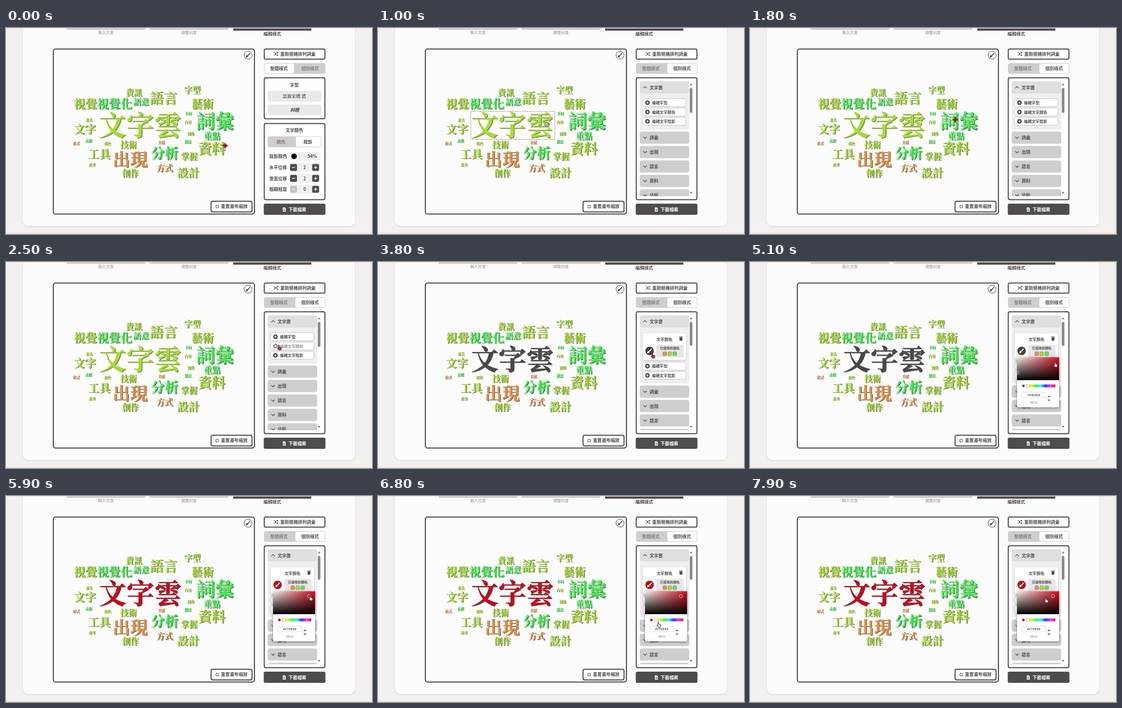
Animation, 688 px wide and 387 px high, one loop 8 s. Source, as an HTML page with a canvas:

```html
<!DOCTYPE html>
<html lang="zh-Hant">
<head>
<meta charset="utf-8">
<title>文字雲</title>
<style>
html, body { margin: 0; width: 100%; height: 100%; overflow: hidden; background: #f3f1ef; }
canvas { display: block; width: 688px; height: 387px; }
</style>
</head>
<body>
<canvas id="stage"></canvas>
<script>
const W = 688, H = 387, LOOP = 8000;
const cv = document.getElementById('stage');
const dpr = window.devicePixelRatio || 1;
cv.width = W * dpr;
cv.height = H * dpr;
const c = cv.getContext('2d');

const SANS = '"Noto Sans CJK TC", "Noto Sans TC", "Noto Sans CJK", sans-serif';
const SERIF = '"Noto Serif CJK TC", "Noto Serif TC", "Noto Sans CJK TC", serif';
const LATIN = '"Noto Serif", "Liberation Serif", serif';
const INK = '#504b4d', GREY = '#d1cdce', PALE = '#eae8e8', WHITE = '#fdfcfd';
const LIME = '#a6dc36', GREEN = '#45ec50', ORANGE = '#df944c';
const PICK_AT = 5300, TAB_AT = 800, EDIT_AT = 2900, OPEN_AT = 4400;

// text, centre x, centre y, size, colour
const words = [
  ['視覺', 150, 143, 22, LIME], ['視覺化', 205, 143, 22, GREEN], ['資訊', 241, 122, 15.5, LIME],
  ['語意', 255, 139, 15, GREEN], ['語言', 297, 132.5, 26, LIME], ['字型', 351, 117, 15.5, LIME],
  ['藝術', 370, 143, 21, LIME], ['詞彙', 394, 176.5, 36, GREEN], ['重點', 388, 203.5, 15.5, GREEN],
  ['資料', 387.5, 227.5, 26, LIME], ['文字', 149, 190, 21, LIME], ['工具', 176, 237, 21, LIME],
  ['技術', 231, 220, 15.5, LIME], ['出現', 234, 248, 33, ORANGE], ['分析', 299, 236, 26, GREEN],
  ['掌握', 345, 242, 15.5, LIME], ['方式', 299, 264, 15.5, ORANGE], ['設計', 343.5, 272, 21, LIME],
  ['創作', 234.5, 273.5, 15.5, LIME], ['兼具', 157, 173.5, 6.5, LIME], ['形式', 133, 217.5, 6.5, ORANGE],
  ['表現', 156, 213, 6.5, GREEN], ['顏色', 192, 218, 6.5, LIME], ['美感', 293, 216, 6.5, ORANGE],
  ['圖像', 348.5, 199.5, 6.5, LIME], ['創意', 343, 214.5, 6.5, GREEN], ['不同', 343.5, 161.5, 6.5, GREEN],
  ['內容', 343, 177.5, 6.5, LIME], ['故事', 163, 258, 6.5, LIME]
];

// time, x, y of the pointer
const path = [
  [0, 412, 221], [250, 412, 221], [700, 317, 181], [1500, 317, 181], [2250, 512, 156],
  [3000, 512, 156], [3600, 515, 171], [4500, 515, 171], [5000, 573, 188], [5350, 571, 187],
  [5900, 571, 187], [6600, 526, 237], [7100, 526, 237], [7750, 555, 191], [LOOP, 555, 191]
];

function pointer(t) {
  let i = 0;
  while (i < path.length - 2 && t >= path[i + 1][0]) i++;
  const [t0, x0, y0] = path[i], [t1, x1, y1] = path[i + 1];
  const k = (t - t0) / (t1 - t0), e = k * k * (3 - 2 * k);
  return [x0 + (x1 - x0) * e, y0 + (y1 - y0) * e];
}

function box(x0, y0, x1, y1, r, fill, stroke, lw = 1) {
  c.beginPath();
  c.roundRect(x0, y0, x1 - x0, y1 - y0, r);
  if (fill) { c.fillStyle = fill; c.fill(); }
  if (stroke) { c.strokeStyle = stroke; c.lineWidth = lw; c.stroke(); }
}

function shadowBox(x0, y0, x1, y1, r, blur, alpha) {
  c.save();
  c.shadowColor = `rgba(0,0,0,${alpha})`;
  c.shadowBlur = blur * dpr;
  c.shadowOffsetY = dpr;
  box(x0, y0, x1, y1, r, '#fff');
  c.restore();
}

function text(s, x, y, size, color = INK, align = 'center', weight = 700, family = SANS, style = '') {
  c.font = `${style} ${weight} ${size}px ${family}`;
  c.textAlign = align;
  c.fillStyle = color;
  c.fillText(s, x, y + size * 0.37);
}

function disc(x, y, r, fill, stroke, lw = 1) {
  c.beginPath();
  c.arc(x, y, r, 0, Math.PI * 2);
  if (fill) { c.fillStyle = fill; c.fill(); }
  if (stroke) { c.strokeStyle = stroke; c.lineWidth = lw; c.stroke(); }
}

// flat list of x, y pairs
function line(pts, color, lw = 1, fill) {
  c.beginPath();
  for (let i = 0; i < pts.length; i += 2) c.lineTo(pts[i], pts[i + 1]);
  if (fill) { c.closePath(); c.fillStyle = fill; c.fill(); }
  if (color) { c.strokeStyle = color; c.lineWidth = lw; c.stroke(); }
}

function plus(x, y, r, color, lw, minus) {
  line([x - r, y, x + r, y], color, lw);
  if (!minus) line([x, y - r, x, y + r], color, lw);
}

function brush(x, y, color) {
  line([x + 4, y - 4, x - 0.5, y + 0.8], color, 1.8);
  disc(x - 2, y + 2, 1.9, color);
  line([x - 2, y + 2, x - 4.6, y + 4.1], color, 1.3);
}

function chevron(x, y, up) {
  const d = up ? -1.6 : 1.6;
  line([x - 3.2, y - d, x, y + d, x + 3.2, y - d], INK, 1.3);
}

// the shadow keeps a hint of the word's own colour
function word(s, x, y, size, color) {
  const d = size > 10 ? 1.3 : 0.6;
  const put = (dx, col) => text(s, x - 0.7 + dx, y - 0.3 - size * 0.035 + dx, size, col, 'center', 900, SERIF);
  c.globalAlpha = 0.5;
  put(d, color);
  put(d, '#000');
  c.globalAlpha = 1;
  put(0, color);
}

function page() {
  c.fillStyle = '#f3f1ef';
  c.fillRect(0, 0, W, H);
  shadowBox(32, -20, 656, 372, 11, 3, 0.12);
  box(32, -20, 656, 372, 11, WHITE);
  c.fillStyle = '#f4dfe0';
  c.fillRect(0, 0, W, 1);
  c.fillStyle = '#ecd6d4';
  c.fillRect(0, 385, W, 1);
  c.fillStyle = '#c3bec0';
  c.fillRect(114, 1, 148, 2);
  c.fillRect(270, 1, 148, 2);
  c.fillStyle = INK;
  c.fillRect(427, 1, 147, 4);
  text('輸入文章', 188, 8.5, 7.2, '#b3aeb0');
  text('調整詞彙', 344, 8.5, 7.2, '#b3aeb0');
  text('編輯樣式', 500.5, 11.4, 8.3);
}

function cloud(t, hover) {
  box(89, 39.5, 467, 349.5, 4, WHITE, INK, 2);
  disc(455, 51, 7.5, '#fff', INK, 1);
  brush(455, 51, INK);
  for (const w of words) word(...w);
  word('文字雲', 253, 184.8, 52, t < EDIT_AT ? LIME : t < PICK_AT ? '#4a4749' : '#b9101f');
  if (hover) {
    c.setLineDash([2, 1.2]);
    box(174.5, 156.5, 332.5, 209.5, 0, null, '#d06a6a', 1);
    c.setLineDash([]);
  }
  box(385.5, 325.5, 462.5, 345.5, 3, '#fff', INK, 2);
  for (const [sx, sy] of [[1, 1], [1, -1], [-1, 1], [-1, -1]])
    line([397 + sx * 1.3, 335.5 + sy * 3.6, 397 + sx * 1.3, 335.5 + sy * 1.3, 397 + sx * 3.6, 335.5 + sy * 1.3], INK, 1.1);
  text('重置畫布縮放', 404, 335.2, 8.4, INK, 'left');
}

function tabs(x0, y0, x1, y1, mid, right, labels, xs) {
  box(x0, y0, x1, y1, 4, GREY);
  if (right) box(mid, y0 + 1, x1 - 1, y1 - 1, 3, '#fff');
  else box(x0 + 1, y0 + 1, mid, y1 - 1, 3, '#fff');
  labels.forEach((s, i) => text(s, xs[i], (y0 + y1) / 2, 8.3, i === +right ? INK : '#827d7f'));
}

function tools(single) {
  box(485.5, 39.5, 599.5, 58.5, 2.5, '#fff', INK, 2);
  line([503, 46.5, 505, 46.5, 508.5, 51, 511, 51], INK, 1.2);
  line([503, 51, 505, 51, 508.5, 46.5, 511, 46.5], INK, 1.2);
  for (const y of [46.5, 51]) line([510, y - 1.8, 512.2, y, 510, y + 1.8], null, 0, INK);
  text('重新隨機排列詞彙', 515.5, 48.8, 8.3, INK, 'left');
  tabs(485, 66, 600.5, 86, single ? 544 : 541.5, single, ['整體樣式', '個別樣式'], [513, 571.5]);
  box(484.5, 330, 600.5, 351, 3, INK);
  line([520.5, 337, 524, 337, 526, 339, 526, 345, 520.5, 345], null, 0, '#fff');
  line([523.3, 339, 523.3, 343], INK, 1);
  line([521.5, 341.5, 523.3, 343.5, 525, 341.5], INK, 0.9);
  text('下載檔案', 531, 340.8, 8.4, '#fff', 'left');
}

function stepper(label, y, value) {
  text(label, 495, y, 8.3, INK, 'left');
  box(533.5, y - 8, 589, y + 8, 3, '#f1efef');
  box(534, y - 6.5, 547, y + 6.5, 2.5, value ? INK : '#c5c1c2');
  plus(540.5, y, 2.8, '#fff', 1.3, true);
  text(value, 561.5, y, 8.3);
  box(575.5, y - 6.5, 588.5, y + 6.5, 2.5, INK);
  plus(582, y, 2.8, '#fff', 1.3);
}

function overall() {
  box(485.5, 93.5, 599.5, 170.5, 3, '#fff', INK, 2);
  text('字型', 542, 106.7, 8.3);
  box(492, 118, 593, 138.5, 4, PALE);
  text('思源宋體 濃', 542, 128.3, 8.4, INK, 'center', 700, SERIF);
  box(492, 143.5, 593, 164, 4, PALE);
  text('斜體', 542.5, 153.8, 8.4, INK, 'center', 700, SANS, 'italic');

  box(485.5, 179.5, 599.5, 322.5, 3, '#fff', INK, 2);
  text('文字顏色', 542, 191.7, 8.3);
  tabs(492, 203.5, 593, 224, 545, true, ['顏色', '陰影'], [517, 567.5]);
  text('陰影顏色', 495, 241, 8.3, INK, 'left');
  box(533, 233, 591, 249, 3, '#f1efef');
  disc(541.5, 241, 5.3, '#000');
  line([551.5, 236, 551.5, 246], '#c3bec0', 0.8);
  text('54%', 584.5, 241, 8.2, INK, 'right');
  stepper('水平位移', 262, 2);
  stepper('垂直位移', 282.5, 2);
  stepper('模糊程度', 303, 0);
}

function addButton(label, y, faded) {
  c.setLineDash([1.5, 1]);
  box(497.5, y - 7.5, 579, y + 7.5, 4, '#fff', '#8f8a8c', 0.8);
  c.setLineDash([]);
  const col = faded ? '#979294' : INK;
  disc(506.5, y, 4.4, col);
  plus(506.5, y, 2.2, '#fff', 1.1);
  text(label, 515, y, 7.3, col, 'left');
}

function item(label, y, open) {
  box(492, y - 11.5, 585, y + 11.5, 4, open ? '#e1dede' : GREY);
  chevron(502, y, open);
  text(label, 510.5, y, 8.3, INK, 'left');
}

function colorCard(t) {
  shadowBox(497.5, 134, 579, 184, 4, 3, 0.2);
  text('文字顏色', 538.5, 145.2, 7.4);
  box(566.8, 141.8, 572.2, 147.8, 0.8, INK);
  line([566, 140.7, 573, 140.7], INK, 1.1);
  disc(510.5, 167, 8, t < PICK_AT ? '#454143' : '#b3131c');
  brush(510.5, 167, '#fff');
  box(523, 155.5, 574.5, 179, 3, '#e8e5e6');
  text('已使用的顏色', 548.5, 162, 6.2);
  [ORANGE, LIME, '#5ce45c'].forEach((col, i) => box(535.5 + i * 9.4, 168.8, 542.5 + i * 9.4, 175.8, 1.5, col, '#7d7a70', 0.7));
}

function individual(t, x, y) {
  const edit = t >= EDIT_AT;
  box(485.5, 93.5, 599.5, 322.5, 3, '#fff', INK, 2);
  c.save();
  c.beginPath();
  c.rect(489, 98, 98, 218);
  c.clip();
  box(492, 105, 585, edit ? 228 : 191, 4, '#f0eeef');
  item('文字雲', 111.5, true);
  if (edit) {
    colorCard(t);
    addButton('編輯字型', 195.5);
    addButton('編輯文字陰影', 213);
  } else {
    ['編輯字型', '編輯文字顏色', '編輯文字陰影'].forEach((s, i) => {
      const by = 140.3 + i * 17.5;
      addButton(s, by, x > 497 && x < 579 && Math.abs(y - by) < 7.5);
    });
  }
  ['詞彙', '出現', '語言', '資料', '分析'].forEach((s, i) => item(s, (edit ? 243.5 : 206) + i * 27.1, false));
  c.restore();
  box(586, 112.5, 591, edit ? 157.5 : 159.5, 2.5, '#8e898b');
  line([586, 107.5, 588.5, 104, 591, 107.5], null, 0, '#77716f');
  line([586, 308, 588.5, 311.5, 591, 308], null, 0, '#77716f');
}

function gradient(x0, y0, x1, y1, stops) {
  const g = c.createLinearGradient(x0, y0, x1, y1);
  stops.forEach((s, i) => g.addColorStop(i / (stops.length - 1), s));
  return g;
}

function picker(t) {
  const red = t >= PICK_AT;
  shadowBox(502, 179, 581, 273, 2, 5, 0.45);
  box(502, 179, 581, 222, 0, gradient(502, 0, 581, 0, ['#f0eaea', '#d01020']));
  box(502, 179, 581, 222, 0, gradient(0, 179, 0, 222, ['rgba(0,0,0,0)', '#000']));
  disc(red ? 569.5 : 502.5, red ? 188.3 : 207.8, 3, null, '#e8e4e4', 0.8);
  disc(514, 232.8, 2.5, red ? '#c01a22' : '#545454');
  box(519, 230, 574, 235.5, 1, gradient(519, 0, 574, 0, ['#f22', '#f4f04a', '#4cf04c', '#4cecf0', '#3a3af4', '#f03cf0', '#f02030']));
  disc(522.5, 232.8, 3.3, '#f8f8f8', '#b8b5b5', 0.6);
  box(511.5, 244.5, 556, 255, 1, '#fff', '#d5d2d2', 0.8);
  text(red ? '#C71E1E' : '#545454', 533.5, 249.5, 6, '#333', 'center', 700, LATIN);
  text('HEX', 533.5, 264, 5.8, '#969696', 'center', 700, LATIN);
  line([560, 253.8, 562, 251.8, 564, 253.8], '#333', 1.3);
  line([560, 258.4, 562, 260.4, 564, 258.4], '#333', 1.3);
}

function moveCursor(x, y) {
  for (const [col, lw, e] of [['#3a1014', 2.2, 0.6], ['#b5283a', 1, 0]]) {
    plus(x, y, 4 + e, col, lw);
    for (let i = 0; i < 4; i++) {
      c.save();
      c.translate(x, y);
      c.rotate(i * Math.PI / 2);
      line([2.2 - e, -2 - e, 5 + e, 0, 2.2 - e, 2 + e], null, 0, col);
      c.restore();
    }
  }
}

function hand(x, y, fill) {
  c.save();
  c.translate(x, y);
  c.lineJoin = 'round';
  line([0, 0, 1.4, 0, 1.8, 3.4, 5, 4.4, 5.6, 6.4, 4.8, 9.6, 1, 9.6, -1.8, 6.4, -1.4, 5.2, 0, 6], '#3a2a2e', 0.9, fill);
  c.restore();
}

function draw(t) {
  const [x, y] = pointer(t);
  const hover = x > 174 && x < 333 && y > 156 && y < 210;
  const single = t >= TAB_AT;
  c.setTransform(dpr, 0, 0, dpr, 0, 0);
  page();
  cloud(t, hover);
  tools(single);
  if (single) individual(t, x, y);
  else overall();
  if (t >= OPEN_AT) picker(t);
  if (hover) {
    disc(x, y, 3.6, 'rgba(240,240,240,.6)', '#45403f', 1);
    line([x - 1.8, y, x + 1.8, y], '#45403f', 0.8);
  } else if (x < 467) moveCursor(x, y);
  else hand(x, y, t >= OPEN_AT ? '#e6e2e2' : '#c42d50');
}

function loop(now) {
  draw(now % LOOP);
  requestAnimationFrame(loop);
}
draw(0);
requestAnimationFrame(loop);
</script>
</body>
</html>
```
